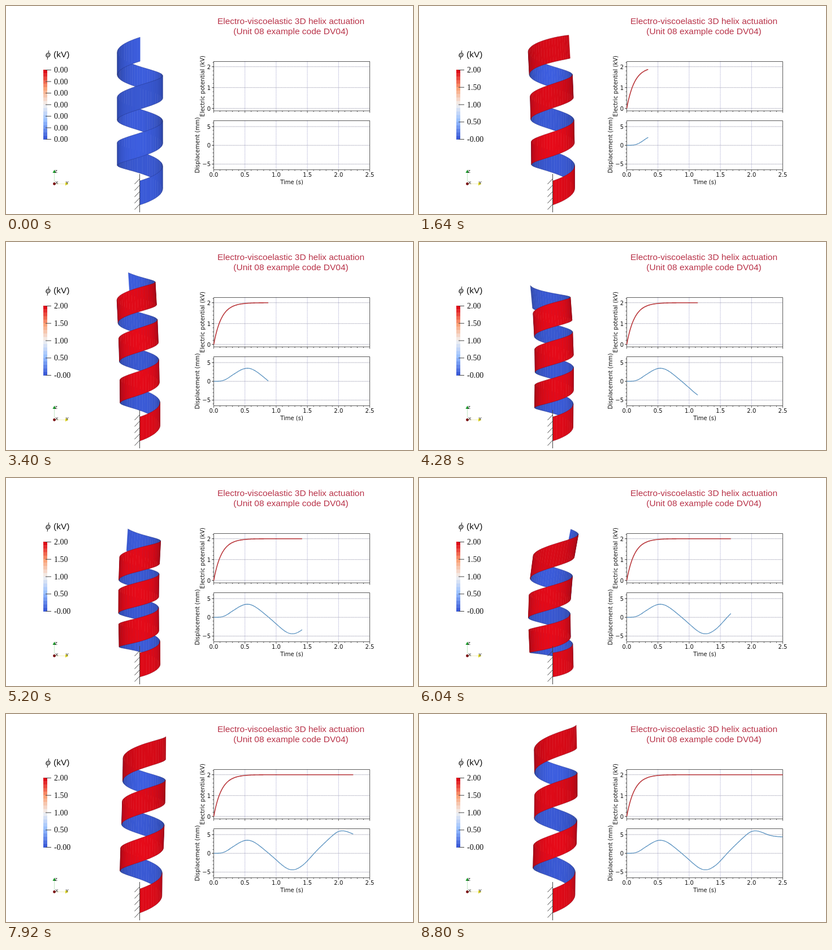
An HTML page with a canvas for the animation above (9360 ms loop, 720 px wide and 369 px high).

```html
<!DOCTYPE html>
<html>
<head>
<meta charset="utf-8">
<style>
html, body { margin: 0; width: 100%; height: 100%; overflow: hidden; background: #fff; }
canvas { display: block; }
</style>
</head>
<body>
<canvas id="stage"></canvas>
<script>
const W = 720, H = 369, LOOP = 9360, START = 480, END = 8800;
const canvas = document.getElementById('stage');
const g = canvas.getContext('2d');
const dpr = window.devicePixelRatio || 1;
canvas.width = W * dpr;
canvas.height = H * dpr;
canvas.style.width = W + 'px';
canvas.style.height = H + 'px';

const SANS = '"Liberation Sans", Arial, sans-serif';
const SERIF = '"Liberation Serif", Times, serif';
const PLOT = '"DejaVu Sans", sans-serif';

const bump = (t, centre, width) => Math.exp(-(((t - centre) / width) ** 2));
const ease = (t, from, to) => {
  const u = Math.min(1, Math.max(0, (t - from) / (to - from)));
  return u * u * (3 - 2 * u);
};

const potential = t => 2 * (1 - Math.exp(-t / 0.125));
const displacement = t => 3.5 * bump(t, 0.54, 0.28) * ease(t, 0, 0.3)
  - 4.4 * bump(t, 1.26, 0.29)
  + 4.4 * ease(t, 1.42, 2.03) + 1.6 * bump(t, 2.06, 0.2);

const STOPS = [[59, 91, 216], [150, 190, 255], [242, 240, 240], [250, 160, 115], [222, 10, 24]];
function colour(v) {
  const p = Math.min(3.999, Math.max(0, v * 4)), i = Math.floor(p);
  return STOPS[i].map((a, c) => a + (STOPS[i + 1][c] - a) * (p - i));
}
const rgb = (c, k = 1) => `rgb(${c.map(x => Math.round(Math.min(255, x * k)))})`;

function line(x1, y1, x2, y2) {
  g.beginPath();
  g.moveTo(x1, y1);
  g.lineTo(x2, y2);
  g.stroke();
}

function label(s, x, y, font, align = 'left', fill = '#111') {
  g.font = font;
  g.textAlign = align;
  g.fillStyle = fill;
  g.fillText(s, x, y);
}

function pen(style, width) {
  g.strokeStyle = style;
  g.lineWidth = width;
}

// ---- helix ----
const PARTS = 156, HORIZON = 185, BASE = 323, CAMERA = 690, HALF = 20;

// Deformation of the whole strip at time t
function poseAt(t) {
  const onset = 1 - bump(t, 0, 0.3), squash = bump(t, 1.66, 0.22);
  return {
    turn: 6 * Math.PI + (82 * onset + 185 * bump(t, 1.18, 0.46)) * Math.PI / 180,
    rise: 83 - 17 * ease(t, 0, 0.7) + 41 * ease(t, 0.8, 1.3) - 66 * ease(t, 1.95, 2.4) - BASE,
    low: -5 * onset + 22 * squash,
    high: -5 * onset + 17 * squash,
    ripple: 6 * onset * Math.cos(7.5 * (t - 1.14)),
    mid: onset * (4 * Math.cos(6 * (t - 1.14)) - 2) + 8 * ease(t, 2, 2.5),
    end: -9 * Math.sin(2 * Math.PI * t / 2.7),
    radius: 40 - 2.4 * onset - 3.6 * bump(t, 1.1, 0.45)
  };
}

// s runs along the strip from the clamped foot (0) to the free tip (1)
function ribbonPoint(s, pose) {
  const angle = s * pose.turn;
  const r = pose.radius + (40 - pose.radius) * Math.exp(-30 * s);
  const y = BASE + pose.rise * s
    + 13.5 * s * (1 - s) * (pose.low * (2 / 3 - s) + pose.high * (s - 1 / 3))
    - pose.ripple * 17.6 * s ** 6 * (1 - s);
  const a = 4 * pose.mid - pose.end, b = pose.end - a;
  const lean = (a + 2 * b * s) / pose.rise * Math.min(1, s * 3) * HALF;
  const x = a * s + b * s * s + r * Math.sin(angle), z = r * Math.cos(angle);
  const k = CAMERA / (CAMERA - z);
  const project = (px, py) => [237 + px * k, HORIZON + (py - HORIZON) * k];
  return { angle, z, top: project(x - lean, y - HALF), low: project(x + lean, y + HALF) };
}

function drawHelix(t) {
  const pose = poseAt(t), outer = colour(potential(t) / 1.85), inner = STOPS[0];
  const pts = [];
  for (let i = 0; i <= PARTS; i++) pts.push(ribbonPoint(i / PARTS, pose));
  const quads = [];
  for (let i = 0; i < PARTS; i++) {
    const p = pts[i], q = pts[i + 1];
    quads.push({ p, q, i, z: p.z + q.z });
  }
  quads.sort((a, b) => a.z - b.z);
  for (const { p, q, i } of quads) {
    const facing = Math.cos((p.angle + q.angle) / 2);
    const grain = Math.sin((i >> 1) * 12.9) * 0.035;
    const shade = 0.55 + 0.45 * Math.abs(facing) ** 0.5 + grain;
    const fill = rgb(facing > 0 ? outer : inner, shade);
    g.beginPath();
    g.moveTo(...p.top);
    g.lineTo(...q.top);
    g.lineTo(...q.low);
    g.lineTo(...p.low);
    g.closePath();
    g.fillStyle = fill;
    g.fill();
    pen(fill, 0.5);
    g.stroke();
    pen('rgba(15,15,50,0.4)', 0.6);
    line(...p.top, ...q.top);
    line(...p.low, ...q.low);
  }
}

function drawWall() {
  pen('#444', 1);
  line(236.5, 298, 236.5, 366);
  for (let i = 0; i < 5; i++) line(236.5, 306.5 + i * 11.3, 227.5, 316 + i * 11.3);
}

function drawTriad() {
  const arrow = (fill, x, y, turn) => {
    g.save();
    g.translate(x, y);
    g.rotate(turn);
    g.fillStyle = fill;
    g.beginPath();
    g.moveTo(-3, 2.5);
    g.lineTo(0, -3);
    g.lineTo(3, 2.5);
    g.fill();
    g.restore();
  };
  pen('#c4e6c6', 1);
  line(85.5, 296, 85.5, 313);
  pen('#f1efc0', 1);
  line(88, 315.5, 105, 315.5);
  arrow('#1a9a2a', 85.5, 293.5, 0);
  arrow('#d8d020', 107.5, 315.5, Math.PI / 2);
  g.fillStyle = '#7a0c10';
  g.beginPath();
  g.arc(85.5, 315.5, 2.4, 0, 7);
  g.fill();
  label('Z', 86, 296, '8px ' + SANS);
  label('X', 87, 316, '8px ' + SANS);
  label('Y', 105.5, 316, '8px ' + SANS);
}

function drawScale(on) {
  label('ϕ', 70, 91, 'italic 17px ' + SERIF);
  label('(kV)', 84, 91, '15.5px ' + SANS);
  const top = 113, height = 123.5, bands = 20, step = height / bands;
  for (let i = 0; i < bands; i++) {
    g.fillStyle = rgb(colour(1 - i / (bands - 1)));
    g.fillRect(66, top + i * step, 7, step + 0.5);
  }
  const count = on ? 4 : 6;
  pen('#444', 1);
  for (let i = 0; i <= count; i++) {
    const y = top + 0.5 + i * (height - 0.5) / count;
    const value = on ? 2 - i / 2 : 0;
    line(70, y, 80, y);
    label((on && !value ? '-' : '') + value.toFixed(2), 85, y + 4.5, '14px ' + SERIF);
  }
}

// ---- plots ----
const LEFT = 367.5, RIGHT = 643.5;
const px = t => LEFT + t * (RIGHT - LEFT) / 2.5;

function drawAxes(top, bottom, ticks, toY, minor, title, titleX) {
  g.setLineDash([1.4, 1]);
  pen('#9c9cc8', 0.8);
  for (let i = 1; i < 5; i++) line(px(i / 2), top, px(i / 2), bottom);
  pen('#85859c', 0.8);
  for (const v of ticks) line(LEFT, toY(v), RIGHT, toY(v));
  g.setLineDash([]);
  pen('#333', 0.8);
  g.strokeRect(LEFT, top, RIGHT - LEFT, bottom - top);
  for (let i = 0; i <= 25; i++) line(px(i / 10), bottom, px(i / 10), bottom + (i % 5 ? 2 : 3.5));
  for (let k = -40; k <= 40; k++) {
    const y = toY(k * minor);
    if (y > top && y < bottom) line(LEFT - 2, y, LEFT, y);
  }
  for (const v of ticks) {
    line(LEFT - 3.5, toY(v), LEFT, toY(v));
    label(String(v).replace('-', '−'), LEFT - 5.5, toY(v) + 3.8, '10px ' + PLOT, 'right');
  }
  g.save();
  g.translate(titleX, (top + bottom) / 2);
  g.rotate(-Math.PI / 2);
  label(title, 0, 0, '10px ' + PLOT, 'center');
  g.restore();
}

function drawCurve(f, toY, t, style, width) {
  if (t <= 0) return;
  const n = Math.ceil(t * 100);
  pen(style, width);
  g.lineJoin = 'round';
  g.beginPath();
  for (let i = 0; i <= n; i++) g.lineTo(px(t * i / n), toY(f(t * i / n)));
  g.stroke();
}

function drawPlots(t) {
  const voltY = v => 181.7 - v * 37, dispY = v => 247.2 - v * 6.65;
  drawAxes(98.5, 186, [0, 1, 2], voltY, 0.2, 'Electric potential (kV)', 351);
  drawAxes(203.5, 290.5, [-5, 0, 5], dispY, 1, 'Displacement (mm)', 342);
  for (let i = 0; i <= 5; i++) label((i / 2).toFixed(1), px(i / 2), 302.5, '10px ' + PLOT, 'center');
  label('Time (s)', 505.5, 316, '10px ' + PLOT, 'center');
  drawCurve(potential, voltY, t, '#b9383c', 1.6);
  drawCurve(displacement, dispY, t, '#5a92c0', 1.3);
}

function draw(ms) {
  const tick = Math.floor(ms / 40) * 40;
  const t = Math.min(2.5, Math.max(0, (tick - 500) / (END - 500) * 2.5));
  g.setTransform(dpr, 0, 0, dpr, 0, 0);
  g.fillStyle = '#fff';
  g.fillRect(0, 0, W, H);
  label('Electro-viscoelastic 3D helix actuation', 504, 31.5, '15.5px ' + SANS, 'center', '#b83248');
  label('(Unit 08 example code DV04)', 504, 50, '15.5px ' + SANS, 'center', '#b83248');
  drawScale(tick >= START);
  drawTriad();
  drawHelix(t);
  drawWall();
  drawPlots(t);
}

const begin = performance.now();
function frame() {
  draw((performance.now() - begin) % LOOP);
  requestAnimationFrame(frame);
}
frame();
</script>
</body>
</html>
```
